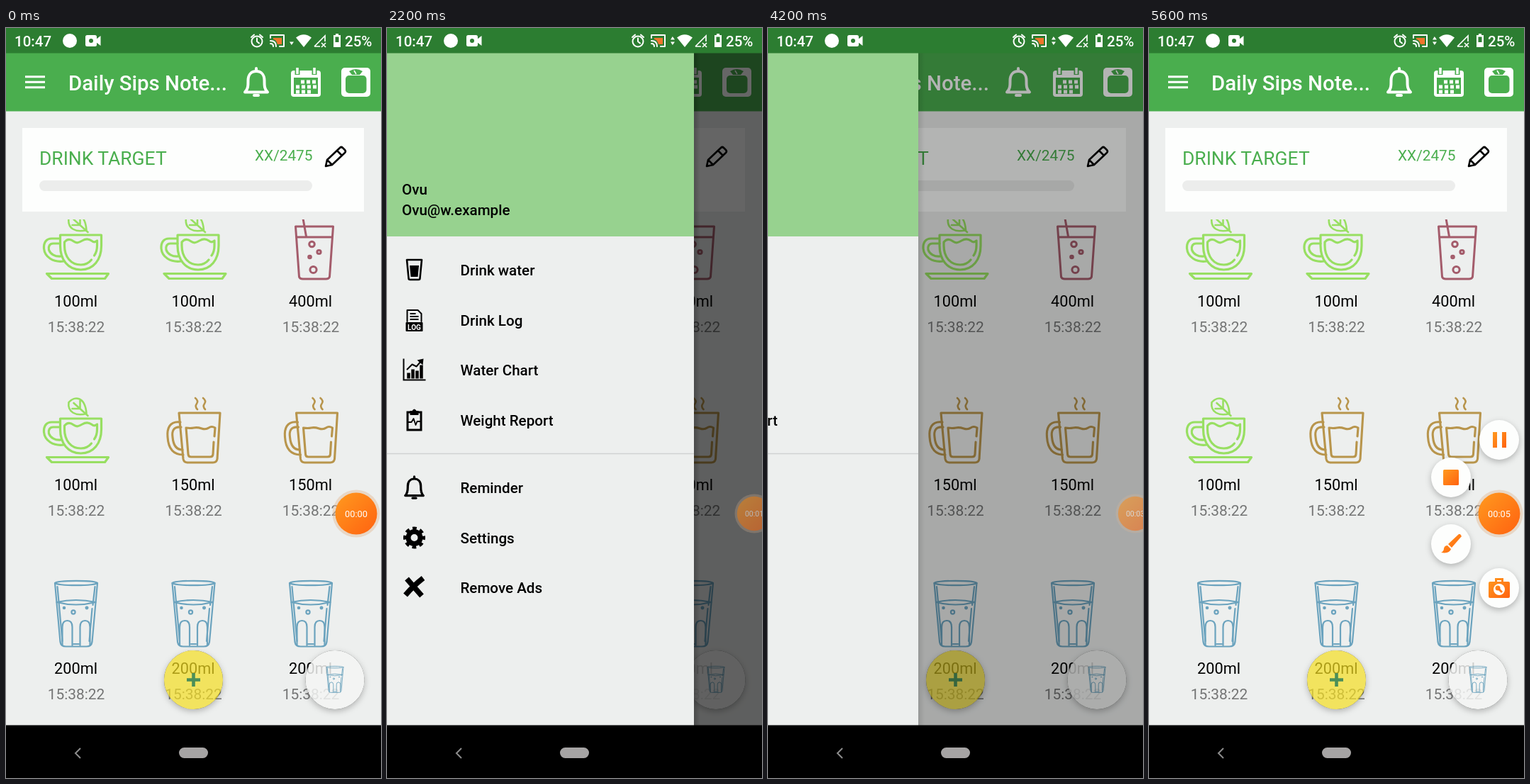
Animation of 529 by 1058 pixels, one loop 5.8 s. Source, as an HTML page:

```html
<!DOCTYPE html>
<html lang="en">
<head>
<meta charset="utf-8">
<title>Drink tracker</title>
<style>
html, body { margin: 0; width: 100%; height: 100%; overflow: hidden; background: #000; }
svg { display: block; width: 100%; height: 100%; }
text { font-family: Roboto, sans-serif; }
.mid { text-anchor: middle; }
.medium { font-weight: 500; }
.line { fill: none; stroke-linecap: round; stroke-linejoin: round; }
.shadow { filter: drop-shadow(0 3px 4px rgba(0,0,0,.25)); }
</style>
</head>
<body>
<svg id="stage" viewBox="0 0 529 1058">
  <defs>
    <clipPath id="listClip"><rect y="270" width="529" height="714"/></clipPath>
    <clipPath id="appClip"><rect y="35" width="529" height="949"/></clipPath>
    <linearGradient id="orange" x1="0" y1="0" x2="1" y2="1">
      <stop offset="0" stop-color="#ff9a1f"/><stop offset="1" stop-color="#ff6210"/>
    </linearGradient>
    <linearGradient id="edgeShade">
      <stop offset="0" stop-opacity=".22"/><stop offset="1" stop-opacity="0"/>
    </linearGradient>
    <!-- Keeps button shadows outside their translucent discs. -->
    <mask id="outside" maskUnits="userSpaceOnUse" x="0" y="0" width="529" height="1058">
      <rect width="529" height="1058" fill="#fff"/>
      <circle cx="264.500" cy="919.500" r="41.500"/><circle cx="464" cy="919.500" r="41.500"/>
    </mask>

    <g id="cup" class="line" stroke="#98df62" stroke-width="3.2">
      <path d="M6 85.500H93L88 92.500H13Z"/>
      <path d="M25 31H83V46C83 66 72 80 54 80C36 80 25 66 25 46Z"/>
      <path d="M31 46V41C35 36 40 37 44 40S51 42 56 39S65 36 69 39S74 41 77 39V46C77 52 76 56 73 60M69 66C65 71 60 73 54 73C40 73 31 62 31 46"/>
      <path d="M24 36H13C5 36 1.500 42 2 50C3 62 15 70 30 68"/>
      <path d="M25 43H15C10 43 8 47 9 52C11 58 18 62 26 61"/>
      <path d="M37 8C45-1 60-1 62 24C47 28 35 22 37 8ZM44 9L64 27M53 6V17H42" stroke-width="2.600"/>
    </g>
    <g id="mug" class="line" stroke="#b8954c" stroke-width="3.100">
      <path d="M27 23H85L81 88Q80 93 75 93H39Q34 93 33 88Z"/>
      <path d="M77 56L78 44Q73 41 69 44T59 45T48 44T37 44L40 81Q40 85 44 85H71Q75 85 75 81L76 64"/>
      <path d="M29 36C13 34 10 46 11 57C12 74 20 82 33 82M30 43C18 42 17 50 18 57C19 69 24 75 32 75"/>
      <path d="M50 2q5 4 2 8t1 8M61 2q5 4 2 8t1 8" stroke-width="2.600"/>
    </g>
    <g id="soda" class="line" stroke="#a45c6b" stroke-width="3">
      <path d="M26 19H79L74 90Q73 93 69 93H36Q32 93 31 90ZM28 34H77M36 5L41 33"/>
      <circle cx="49" cy="44" r="3.800"/><circle cx="59" cy="55" r="2.600"/>
      <circle cx="46" cy="62" r="1.800"/><circle cx="51" cy="80" r="4.600"/>
    </g>
    <g id="glass" class="line" stroke="#6ba3be" stroke-width="2.200">
      <ellipse cx="47.500" cy="4" rx="30" ry="3.200"/>
      <path d="M17.500 4L25 87Q26 93.500 33 93.500H62Q69 93.500 70 87L77.500 4M21 9L28 86M74 9L71 35M70 40L66 86"/>
      <path d="M20 31Q47 25 75 31Q47 38 20 31"/>
      <path d="M28 92V66Q28 57 35 57T42 66V92M53 92V66Q53 57 60 57T67 66V92M44 90H51"/>
      <circle cx="43.500" cy="45" r="2.600"/>
      <circle cx="30.500" cy="39" r="1.200"/><circle cx="62.500" cy="39" r="1.400"/>
    </g>
    <g id="bell" class="line" stroke-width="4">
      <path d="M-16 14.500C-11 10-11.500 4-11.500-2C-11.500-10-7-15 0-15S11.500-10 11.500-2C11.500 4 11 10 16 14.500ZM0-16V-19"/>
      <path d="M-3 19H3"/>
    </g>
  </defs>

  <rect width="529" height="1058" fill="#edefee"/>
  <rect y="35" width="529" height="82.500" fill="#4aae4e"/>
  <path id="burger" d="M27 68.800H55M27 76.300H55M27 83.800H55" stroke="#fff" stroke-width="2.900"/>
  <text class="medium" x="88" y="88" font-size="29.400" fill="#fff">Daily Sips Note...</text>
  <use href="#bell" x="353" y="76" stroke="#fff"/>
  <g fill="#fff">
    <path d="M406 60H440Q444 60 444 64V93Q444 97 440 97H406Q402 97 402 93V64Q402 60 406 60Z"/>
    <path d="M406 70H440V93H406Z" fill="#4aae4e"/>
    <path d="M411 56V66M435 56V66" stroke="#4aae4e" stroke-width="7"/>
    <path d="M411 56V65M435 56V65" stroke="#fff" stroke-width="3.500"/>
    <path d="M416 76H438M409 83H438M409 90H431" stroke="#fff" stroke-width="5" stroke-dasharray="5 3"/>
    <rect x="473" y="56" width="41" height="41" rx="5"/>
    <rect x="479" y="67" width="29.500" height="25" rx="5" fill="#4aae4e"/>
    <path d="M484 61Q493.500 55 503 61L499 66H488Z" fill="#4aae4e"/>
    <path d="M494 65L491 60" stroke="#fff" stroke-width="1.500"/>
  </g>

  <rect x="23" y="141" width="482" height="118" fill="#fdfefd"/>
  <g fill="#4aae4e">
    <text x="47" y="193" font-size="26.450">DRINK TARGET</text>
    <text x="432.500" y="187" font-size="20.800" text-anchor="end">XX/2475</text>
  </g>
  <rect x="47" y="215" width="385" height="15" rx="7.500" fill="#ecedec"/>
  <g class="line" stroke="#000" stroke-width="2.600">
    <path d="M451 195L453 186L471 169Q473 167 475 169L478 172Q480 174 478 176L460 193ZM453 186L460 193M467 173L474 180"/>
  </g>

  <g id="list" clip-path="url(#listClip)"></g>

  <g mask="url(#outside)">
    <circle class="shadow" cx="264.500" cy="919.500" r="41.500"/>
    <circle class="shadow" cx="464" cy="919.500" r="41.500"/>
  </g>
  <circle cx="264.500" cy="919.500" r="41.500" fill="#f6df22" fill-opacity=".7"/>
  <path d="M255 919.500H274M264.500 910V929" stroke="#4c8f58" stroke-width="4.600"/>
  <circle cx="464" cy="919.500" r="41.500" fill="#f5f6f5" fill-opacity=".84"/>
  <use href="#glass" transform="translate(445 900) scale(.4)"/>

  <g clip-path="url(#appClip)">
    <rect id="scrim" y="35" width="529" height="949" opacity="0"/>
    <g id="drawer">
      <rect id="shade" x="433" y="35" width="9" height="949" fill="url(#edgeShade)"/>
      <rect y="35" width="433" height="949" fill="#edefee"/>
      <rect y="35" width="433" height="259" fill="#97d28f"/>
      <path d="M0 600.500H433" stroke="#d0d2d1" stroke-width="1.600"/>
      <g id="menu" class="medium" font-size="20.600">
        <text x="21" y="235">Ovu</text>
        <text x="21" y="264">Ovu@w.example</text>
      </g>
      <g transform="translate(38.500 341)">
        <path class="line" d="M-10.500-14H10.500L8 12Q8 14 6 14H-6Q-8 14-8 12Z" stroke="#000" stroke-width="2.600"/>
        <path d="M-6.500-6H6.500L5 10H-5Z"/>
      </g>
      <g transform="translate(38.500 412)">
        <path class="line" d="M-10 2V-14H5L10-9V2" stroke="#000" stroke-width="2"/>
        <path d="M-6-9H2M-6-5H6M-6-1H6" stroke="#000" stroke-width="2"/>
        <rect x="-12" y="3" width="24" height="13" rx="1"/>
        <text class="mid" y="13.500" font-size="10" font-weight="700" fill="#fff">LOG</text>
      </g>
      <g transform="translate(38.500 482.500)">
        <path d="M-15-16V14H16" fill="none" stroke="#000" stroke-width="2"/>
        <path d="M-8 12V4M-2 12V-1M4 12V1M10 12V-7" stroke="#000" stroke-width="4.500"/>
        <path class="line" d="M-10-1L-3-8L3-5L10-13" stroke="#000" stroke-width="2"/>
        <path d="M4-14L13-16L12-7Z"/>
      </g>
      <g transform="translate(38.500 553)">
        <rect x="-9.500" y="-11" width="19" height="25" fill="none" stroke="#000" stroke-width="3"/>
        <path d="M-6-13H-3Q0-18 3-13H6V-7H-6Z"/>
        <path class="line" d="M-8 3H-4L-1-2L2 7L4 2H8" stroke="#000" stroke-width="1.800"/>
      </g>
      <use href="#bell" transform="translate(38.500 648) scale(.8)" stroke="#000"/>
      <g transform="translate(38.500 719)" fill="none" stroke="#000">
        <circle r="8.500" stroke-width="7"/>
        <circle r="13" stroke-width="5" stroke-dasharray="5.600 4.610" stroke-dashoffset="2.800"/>
      </g>
      <path d="M28 777L49 801M51 776Q37 787 26 800" stroke="#000" stroke-width="7.500" fill="none"/>
    </g>
  </g>

  <rect width="529" height="35.500" fill="#2c7d31"/>
  <g fill="#fff">
    <text class="medium" x="12" y="25.500" font-size="20.500">10:47</text>
    <circle cx="90" cy="18" r="10"/>
    <rect x="112" y="10" width="16" height="16" rx="2.500"/>
    <path d="M127 16L133.500 11V25L127 20Z"/>
    <circle cx="120" cy="18" r="3" fill="#2c7d31"/>
    <g class="line" stroke="#fff" stroke-width="2">
      <circle cx="354" cy="19" r="7.500"/>
      <path d="M354 14.500V19L357 21.500M346 13L350 9.500M362 13L358 9.500"/>
      <path d="M373 14V10H392V26H386M373 18Q381 18 381 26M373 22Q377 22 377 26"/>
    </g>
    <path d="M377 14H389V23H383Q381 16 377 16Z" fill="#f0752c"/>
    <path d="M400 19.500H406L402.800 24Z"/>
    <path id="upArrow" d="M400 16.500H406L402.800 12Z"/>
    <path d="M409 13.500Q420 5 431 13.500L420 27Z"/>
    <path d="M435 26L450 11V19M435 26H443M445 21L451 27M451 21L445 27" fill="none" stroke="#fff" stroke-width="1.700"/>
    <path d="M465 8H469V10H472V27H462V10H465Z"/>
    <path d="M464.500 12.500H469.500V20H464.500Z" fill="#2c7d31"/>
    <text class="medium" x="478" y="25.500" font-size="20.500">25%</text>
  </g>

  <rect y="983.500" width="529" height="75"/>
  <path d="M105 1016L98 1023L105 1030" fill="none" stroke="#8c8c8c" stroke-width="2"/>
  <rect x="244" y="1015" width="41" height="15" rx="7.500" fill="#a6a4a4"/>

  <g id="tools"></g>
  <g id="bubble">
    <circle r="33.500" fill="#dfb994" fill-opacity=".45"/>
    <circle r="29.500" fill="url(#orange)"/>
    <text id="timer" class="mid" y="4.600" font-size="12.800" fill="#fff"></text>
  </g>
</svg>
<script>
const LOOP = 5800, STEP = 200, DRAWER = 433;
const $ = id => document.getElementById(id);

// Time/value points; values between points are linear.
const tracks = {
  edge: [[1400, 0], [1600, 70], [1800, 250], [2000, 395], [2200, 433], [3400, 433], [3600, 415],
         [3800, 371], [4000, 298], [4200, 212], [4400, 100], [4600, 8], [4800, 0]],
  fade: [[200, 1], [800, .56], [4800, .56], [5000, 1]],
  dock: [[1400, 0], [1800, 1], [4800, 1], [5000, 0]],
  tools: [[5000, 0], [5200, .35], [5400, .85], [5600, 1]]
};
const ticks = [1200, 2400, 3400, 4800, 5600];

const rows = [
  [['cup', 100], ['cup', 100], ['soda', 400]],
  [['cup', 100], ['mug', 150], ['mug', 150]],
  [['glass', 200], ['glass', 200], ['glass', 200]]
];
$('list').innerHTML = rows.map((row, r) => row.map(([icon, amount], c) =>
  `<g transform="translate(${51.5 + 165.5 * c} ${261 + 259 * r})">
    <use href="#${icon}"/>
    <text class="mid" x="47" y="132" font-size="21.700">${amount}ml</text>
    <text class="mid" x="47.500" y="168" font-size="20.900" fill="#747575">15:38:22</text>
  </g>`).join('')).join('');

const menu = [['Drink water', 341], ['Drink Log', 412], ['Water Chart', 482.5], ['Weight Report', 553],
  ['Reminder', 648.5], ['Settings', 719], ['Remove Ads', 789.5]];
$('menu').innerHTML += menu.map(([label, y]) => `<text x="103.500" y="${y + 7.5}">${label}</text>`).join('');

const tools = [
  [0, -104, '<path d="M-9-11H-3V11H-9ZM4-11H10V11H4Z"/>'],
  [-68, -51, '<rect x="-11" y="-11" width="22" height="22" rx="1.500"/>'],
  [-68, 43, '<path d="M13-14L15-11L1 5L-4 0L11-14ZM-5 2L0 7Q-2 14-14 12Q-10 10-10 6Q-9 2-5 2Z"/>'],
  [0, 105, `<path d="M-13-9H-6V-14H6V-9H13Q15-9 15-7V12Q15 14 13 14H-13Q-15 14-15 12V-7Q-15-9-13-9ZM-3-11V-9H3V-11Z" fill-rule="evenodd"/>
    <circle cy="2" r="8" fill="#fff"/>
    <path d="M-1 1L4 6" stroke="#ff7a18" stroke-width="3"/><circle cx="-2" cy="0" r="3.500"/>`]
];
$('tools').innerHTML = tools.map(([, , shape]) =>
  `<g><circle class="shadow" r="28" fill="#fdfefd"/><g fill="url(#orange)">${shape}</g></g>`).join('');

function valueAt(points, t) {
  const i = points.findIndex(p => p[0] > t);
  if (i === 0) return points[0][1];
  if (i < 0) return points[points.length - 1][1];
  const [[t0, a], [t1, b]] = [points[i - 1], points[i]];
  return a + (b - a) * (t - t0) / (t1 - t0);
}

function draw(t) {
  const edge = valueAt(tracks.edge, t), open = edge / DRAWER;
  const dock = valueAt(tracks.dock, t), spread = valueAt(tracks.tools, t);

  $('drawer').setAttribute('transform', `translate(${edge - DRAWER} 0)`);
  $('shade').setAttribute('opacity', open);
  $('scrim').setAttribute('opacity', .6 * open);
  $('burger').setAttribute('transform', `rotate(${-180 * open} 41 76.300)`);
  $('upArrow').setAttribute('opacity', t >= 1200 ? 1 : 0);

  $('bubble').setAttribute('transform', `translate(${494 + 24 * dock} 685) scale(${1 - .18 * dock})`);
  $('bubble').setAttribute('opacity', valueAt(tracks.fade, t));
  $('timer').textContent = '00:0' + ticks.filter(tick => t >= tick).length;

  $('tools').setAttribute('opacity', spread ? 1 : 0);
  [...$('tools').children].forEach((tool, i) => tool.setAttribute('transform',
    `translate(${494 + tools[i][0] * spread} ${685 + tools[i][1] * spread}) scale(${spread})`));
}

const start = performance.now();
function tick() {
  const t = (performance.now() - start) % LOOP;
  draw(Math.floor(t / STEP) * STEP);
  requestAnimationFrame(tick);
}
tick();
</script>
</body>
</html>
```
